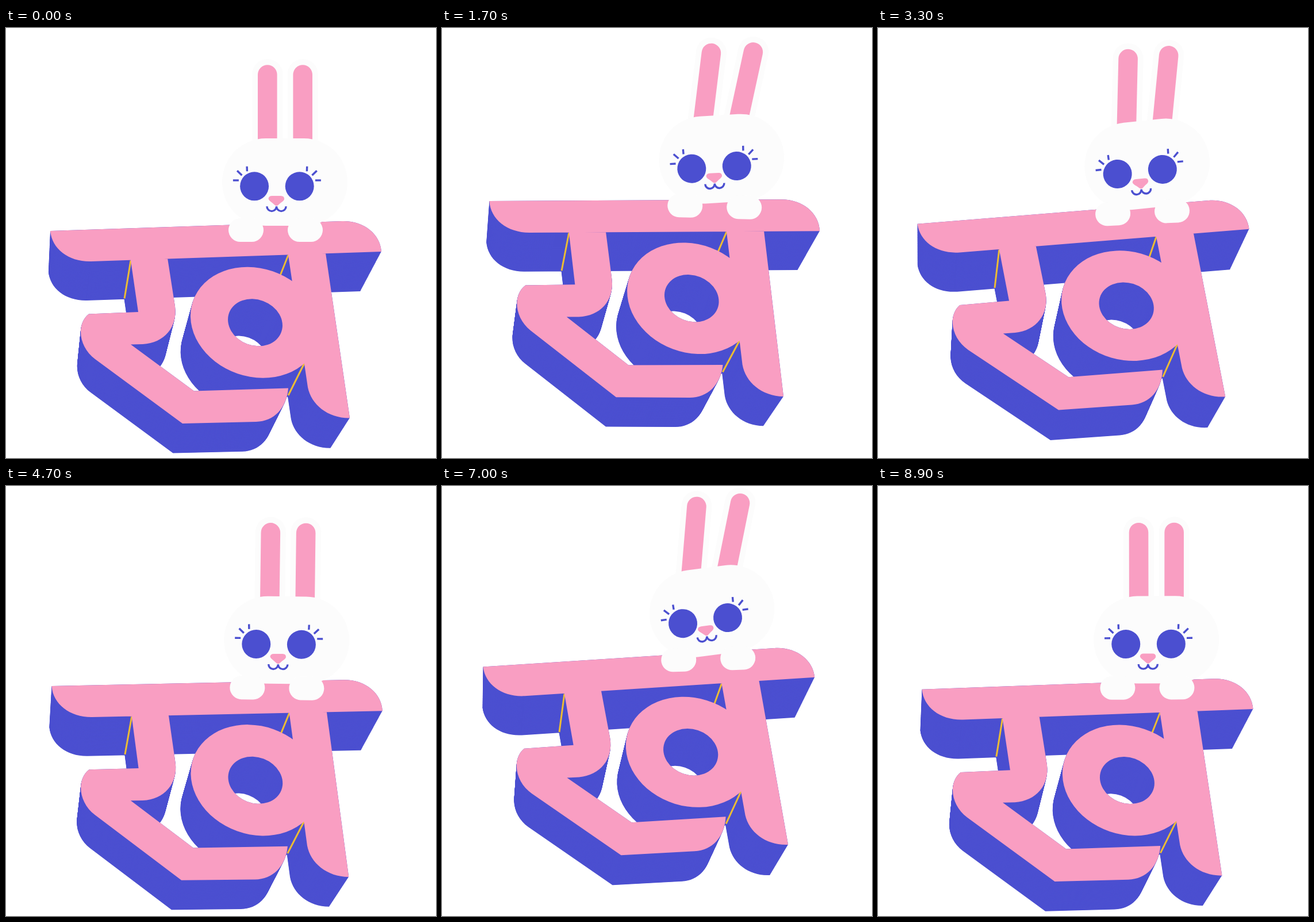
Recreate the animation shown at these times as an HTML page with a canvas. Size 748 by 748 pixels, loop 9000 ms.

```html
<!DOCTYPE html>
<html lang="hi">
<head>
<meta charset="utf-8">
<title>ख</title>
<style>
  html, body { margin: 0; width: 100%; height: 100%; overflow: hidden; background: #fff; }
  canvas { display: block; width: 748px; height: 748px; }
</style>
</head>
<body>
<canvas id="stage" width="748" height="748"></canvas>
<script>
const ctx = document.getElementById('stage').getContext('2d');
const PINK = '#f99ec2', BLUE = '#4b4fd0', WHITE = '#fcfcfc', GOLD = '#ecbc34';
const PERIOD = 4.5, RAD = Math.PI / 180;

// Front face of the letter; all outlines clockwise, the counter reversed
const letter = new Path2D(
  'M77 353 L585 336 C622 335 651 358 653 389 L148 406 C110 407 80 385 77 353 Z ' +
  'M215.5 394 L279.7 392 L294 484 C299 520 275 548 238 550 L217 550.5 L327 631.5 ' +
  'L491 626.5 C488 662 466 684 435 685 L307 688 L155 576 ' +
  'C139 564 130 546 130 528 C130 518 134 505 144 497.5 L230 494 Z ' +
  'M489.5 385 L555 385 L598 678.5 C560 679 531 655 525 625 Z');
function addOval(rx, ry, tilt, reverse) {
  const p = new Path2D();
  p.ellipse(433.5, 512.3, rx, ry, tilt * RAD, 0, 2 * Math.PI, reverse);
  letter.addPath(p);
}
addOval(114.5, 94.1, 19, false);
addOval(48.4, 39.9, 20.3, true);

const nose = new Path2D(
  'M463 292 H478 Q484.5 292 484 298 Q483 301 478 304 L473.5 308 ' +
  'Q470.5 310.5 467.5 308 L463 304 Q457 300 456.5 297 Q457 292 463 292 Z');

// Swing of the letter: [seconds, degrees]
const swing = [[0, 0], [0.2, 0.72], [0.55, 1.95], [0.95, 2.8], [1.3, 2.8], [1.7, 1.6],
  [2.05, 0.1], [2.5, -1.75], [2.95, -2.75], [3.3, -2.7], [3.65, -1.95], [4, -1.1], [4.4, -0.18]];

function key(i) {
  const n = swing.length, turn = Math.floor(i / n), k = swing[i - turn * n];
  return [k[0] + turn * PERIOD, k[1]];
}

function swingAt(t) {
  let i = swing.length - 1;
  while (swing[i][0] > t) i--;
  const [a, b, c, d] = [key(i - 1), key(i), key(i + 1), key(i + 2)];
  const h = c[0] - b[0], u = (t - b[0]) / h;
  const m0 = h * (c[1] - a[1]) / (c[0] - a[0]);
  const m1 = h * (d[1] - b[1]) / (d[0] - b[0]);
  const u2 = u * u, u3 = u2 * u;
  return (2 * u3 - 3 * u2 + 1) * b[1] + (u3 - 2 * u2 + u) * m0 +
    (3 * u2 - 2 * u3) * c[1] + (u3 - u2) * m1;
}

function turnAbout(x, y, deg) {
  ctx.translate(x, y);
  ctx.rotate(deg * RAD);
  ctx.translate(-x, -y);
}

function group(draw) {
  ctx.save();
  draw();
  ctx.restore();
}

function pill(x, y, w, h, r, color) {
  ctx.fillStyle = color;
  ctx.beginPath();
  ctx.roundRect(x, y, w, h, r);
  ctx.fill();
}

function disc(x, y, r) {
  ctx.beginPath();
  ctx.arc(x, y, r, 0, 2 * Math.PI);
  ctx.fill();
}

function line(x1, y1, x2, y2) {
  ctx.beginPath();
  ctx.moveTo(x1, y1);
  ctx.lineTo(x2, y2);
  ctx.stroke();
}

// Point pushed back along the depth of the letter, u from 0 to 1
function push(x, y, u) {
  const s = 1 - 0.058 * u;
  return [x * s + 1.3 * u, y * s + 91.5 * u];
}

function drawLetter() {
  const steps = 90;
  ctx.fillStyle = BLUE;
  for (let i = steps; i >= 0; i--) {
    const u = i / steps, s = 1 - 0.058 * u;
    group(() => {
      ctx.translate(1.3 * u, 91.5 * u);
      ctx.scale(s, s);
      ctx.fill(letter);
    });
  }
  ctx.strokeStyle = GOLD;
  ctx.lineWidth = 3;
  for (const [x, y] of [[217, 404.5], [491, 395], [519, 583]]) line(x, y, ...push(x, y, 0.97));
  ctx.fillStyle = PINK;
  ctx.fill(letter);
}

function drawEar(x, deg) {
  group(() => {
    turnAbout(x, 210, deg);
    pill(x - 26.5, 54, 53, 175, 26.5, WHITE);
    pill(x - 16.8, 64.3, 33.6, 150, [16.8, 16.8, 0, 0], PINK);
  });
}

function drawEyes() {
  ctx.fillStyle = ctx.strokeStyle = BLUE;
  ctx.lineWidth = 3.4;
  for (const side of [-1, 1]) {
    group(() => {
      ctx.translate(471.4, 275.3);
      ctx.scale(side, 1);
      disc(39.3, 0, 25);
      line(52.3, -34.5, 52, -26);
      line(69.3, -27, 61, -19);
      line(66.5, -10.3, 76.5, -10.3);
    });
  }
}

function drawMouth() {
  ctx.fillStyle = PINK;
  ctx.fill(nose);
  ctx.strokeStyle = BLUE;
  ctx.lineWidth = 3.4;
  ctx.beginPath();
  ctx.arc(478.8, 310.3, 8.3, 0, Math.PI);
  ctx.moveTo(470.5, 310.3);
  ctx.arc(462.2, 310.3, 8.3, 0, Math.PI);
  ctx.stroke();
}

function draw(t) {
  const w = 2 * Math.PI * t / PERIOD;
  const lift = 1 - Math.cos(w), lag = Math.sin(w);
  ctx.fillStyle = '#fff';
  ctx.fillRect(0, 0, 748, 748);
  group(() => {
    ctx.translate(0, -25 * lift);
    turnAbout(400, 540, swingAt(t));
    drawLetter();
    group(() => {
      turnAbout(485, 340, -2.9 * lift);
      drawEar(454.8, 6.2 * lift - 0.4 * lag);
      drawEar(516.2, 9.5 * lift - lag);
      pill(376, 192, 218, 152, 76, WHITE);
      drawMouth();
      ctx.translate(0, 3.9 * lift);
      drawEyes();
    });
    pill(387, 331, 61, 41, 20.5, WHITE);
    pill(490, 331, 61, 41, 20.5, WHITE);
  });
}

// The picture steps ten times a second
const start = performance.now();
let last = -1;
function tick() {
  const step = Math.max(0, Math.floor((performance.now() - start) / 100)) % 90;
  if (step !== last) {
    last = step;
    draw((step % 45) / 10);
  }
  requestAnimationFrame(tick);
}
tick();
</script>
</body>
</html>
```
